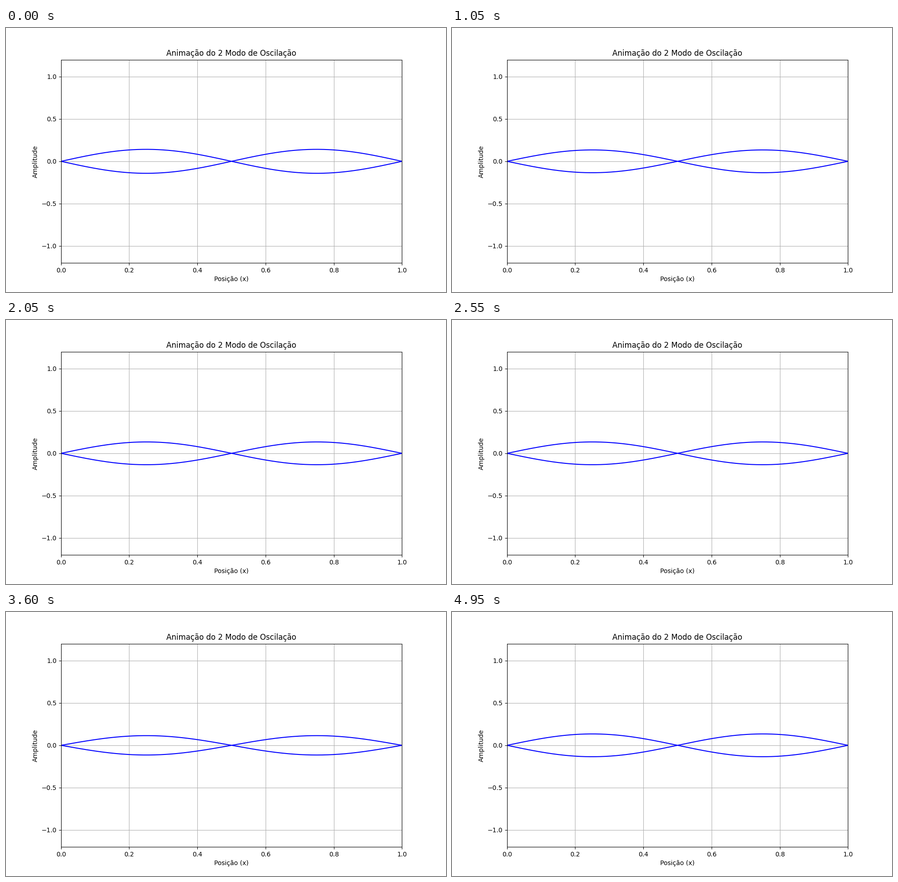
Write a matplotlib script that moves like this. It is 966 px wide and 580 px high and loops after 5000 ms.

```python
import numpy as np
import matplotlib.pyplot as plt
from matplotlib.animation import FuncAnimation

MODE = 2
LENGTH = 1.0
AMPLITUDE = 0.1 * np.sqrt(2 / LENGTH)
PERIOD = 1.0  # seconds
FRAMES = 100
INTERVAL = 50  # ms

x = np.linspace(0, LENGTH, 1000)
shape = AMPLITUDE * np.sin(MODE * np.pi * x / LENGTH)

fig, ax = plt.subplots(figsize=(9.66, 5.80), dpi=100)
ax.set_xlim(0, LENGTH)
ax.set_ylim(-1.2, 1.2)
ax.set_title(f"Animação do {MODE} Modo de Oscilação")
ax.set_xlabel("Posição (x)")
ax.set_ylabel("Amplitude")
ax.grid(True)

upper, = ax.plot(x, shape, color="blue")
lower, = ax.plot(x, -shape, color="blue")


def update(frame):
    t = frame * INTERVAL / 1000
    y = shape * np.cos(2 * np.pi * t / PERIOD)
    upper.set_ydata(y)
    lower.set_ydata(-y)
    return upper, lower


anim = FuncAnimation(fig, update, frames=FRAMES, interval=INTERVAL,
                     repeat=True, repeat_delay=0)
plt.show()
```
